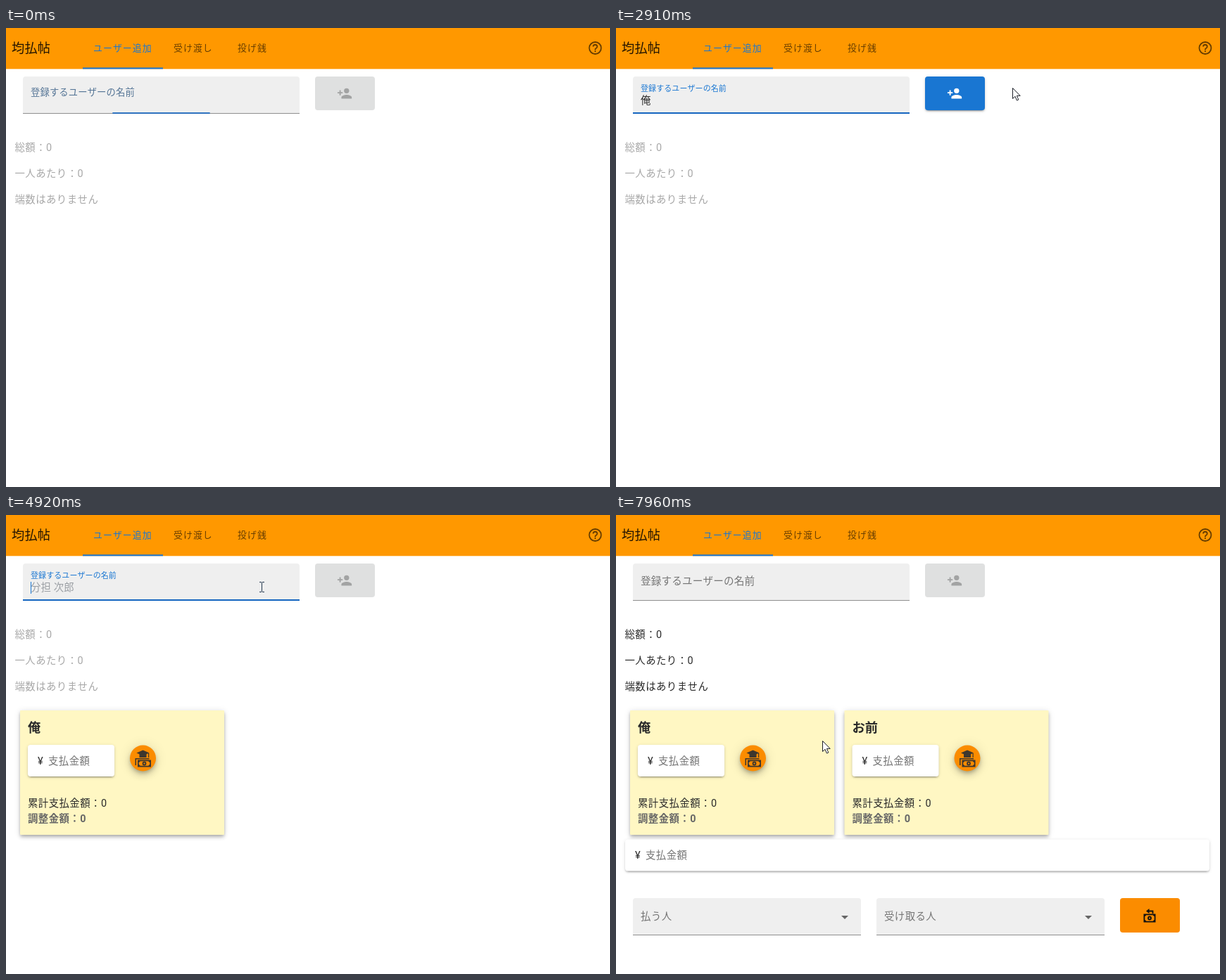
Recreate the animation shown at these times as an HTML page with a canvas. Size 858x653 px, loop 8000 ms.

```html
<!DOCTYPE html>
<html lang="ja">
<head>
<meta charset="utf-8">
<title>割り勘メモ</title>
<style>
html, body { margin: 0; width: 100%; height: 100%; overflow: hidden; background: #fff; }
canvas { display: block; }
</style>
</head>
<body>
<canvas id="stage" width="858" height="653"></canvas>
<script>
const ctx = document.getElementById('stage').getContext('2d');
const LOOP = 8000;
const BLUE = '#1976d2', ORANGE = '#fb8c00', INK = '#2a2a2a', MUTED = '#757575';
const FONT = 'Roboto, "Noto Sans CJK JP", "Noto Sans CJK", sans-serif';

const PERSON = new Path2D('M15 12a4 4 0 1 0 0-8 4 4 0 0 0 0 8zM6 10V7H4v3H1v2h3v3h2v-3h3v-2zM15 14c-2.67 0-8 1.34-8 4v2h16v-2c0-2.66-5.33-4-8-4z');
const QUESTION = new Path2D('M11 18h2v-2h-2zM12 6a4 4 0 0 0-4 4h2a2 2 0 0 1 4 0c0 2-3 1.75-3 5h2c0-2.25 3-2.5 3-5a4 4 0 0 0-4-4z');
const ARROW = new Path2D('M.5 .5V15.5L4 12.3L6.4 18L8.8 17L6.4 11.4H11.2Z');

// Shadow layers: offset, blur, spread, alpha
const LOW = [[3, 1, -2, 0.2], [2, 2, 0, 0.14], [1, 5, 0, 0.12]];
const MID = [[2, 4, -1, 0.2], [4, 5, 0, 0.14], [1, 10, 0, 0.12]];
const HIGH = [[3, 5, -1, 0.2], [6, 10, 0, 0.14], [1, 18, 0, 0.12]];

const clamp = v => Math.min(1, Math.max(0, v));
const ease = v => { v = clamp(v); return v * v * (3 - 2 * v); };
const mix = (a, b, p) => a + (b - a) * p;
const within = (t, spans) => spans.some(([a, b]) => t >= a && t < b);
const last = (t, list) => list.filter(s => s[0] <= t).pop();

// Timeline
const ADDED = [3855, 7600];
const PRESSED = [3600, 7430];
const FOCUS = [[-72, 1], [420, 0], [900, 1], [ADDED[0], 0], [4560, 1], [ADDED[1], 0]];
const CARET = [[960, 1370], [1570, 2570], [3070, 3570], [4640, 6620], [7120, 7430]];
const ENABLED = [[1570, ADDED[0]], [5200, ADDED[1]]];
const COMPOSING = [[1570, 2110], [5200, 6210]];
const TYPED = [
  [-100, ''], [1570, 'お'], [1700, 'おr'], [1770, 'おれ'], [1910, '俺'], [ADDED[0], ''],
  [5200, 'お'], [5340, 'おm'], [5540, 'おま'], [5740, 'おまえ'], [6010, 'お前'], [ADDED[1], '']
];
const HINTS = [[1570, 1910, ['俺', '俺の']], [5200, 6010, ['お前', 'お前の']]];
const MOUSE = [
  [210, 743, 610], [300, 743, 610], [680, 233, 182], [830, 197, 113], [2500, 197, 113],
  [2880, 563, 85], [2950, 563, 85], [3320, 525, 93], [4020, 523, 90],
  [4160, 472, 93], [4440, 363, 102], [6560, 363, 102],
  [6960, 425, 121], [7280, 480, 102], [7600, 480, 102], [7940, 293, 321]
];

function text(s, x, mid, size, color, weight = 400, space = 0) {
  ctx.font = `${weight} ${size}px ${FONT}`;
  ctx.letterSpacing = space + 'px';
  ctx.fillStyle = color;
  ctx.fillText(s, x, mid + size * 0.375);
}
const body = (s, x, mid, color, weight) => text(s, x, mid, 14.4, color, weight, 0.45);

function rect(x, y, w, h, color) {
  ctx.fillStyle = color;
  ctx.fillRect(x, y, w, h);
}

function box(x, y, w, h, radius, color) {
  ctx.fillStyle = color;
  ctx.beginPath();
  ctx.roundRect(x, y, w, h, radius);
  ctx.fill();
}

// The caster stands off stage so that only its shadow shows.
function raised(x, y, w, h, radius, color, layers) {
  const away = 2000;
  ctx.save();
  ctx.shadowOffsetX = away;
  for (const [dy, blur, spread, alpha] of layers) {
    ctx.shadowColor = `rgba(0,0,0,${alpha})`;
    ctx.shadowBlur = blur;
    ctx.shadowOffsetY = dy;
    box(x - spread - away, y - spread, w + 2 * spread, h + 2 * spread, radius, '#000');
  }
  ctx.restore();
  box(x, y, w, h, radius, color);
}

function icon(path, x, y, scale, color) {
  ctx.save();
  ctx.translate(x, y);
  ctx.scale(scale, scale);
  ctx.fillStyle = color;
  ctx.fill(path);
  ctx.restore();
}

function poly(points, color) {
  ctx.fillStyle = color;
  ctx.beginPath();
  points.forEach(([x, y]) => ctx.lineTo(x, y));
  ctx.fill();
}

function ring(x, y, r, width, color) {
  ctx.strokeStyle = color;
  ctx.lineWidth = width;
  ctx.beginPath();
  ctx.arc(x, y, r, 0, 7);
  ctx.stroke();
}

const inside = (p, x, y, w, h) => p && p.x >= x && p.x <= x + w && p.y >= y && p.y <= y + h;
const overField = p => inside(p, 24, 69, 393, 53);
const overButton = p => inside(p, 439, 69, 85, 48);

function filled(x, y, w, line = '#8f8f8f') {
  box(x, y, w, 53, [4, 4, 0, 0], '#efefef');
  rect(x, y + 52, w, 1, line);
}

function header() {
  rect(0, 0, 858, 58.3, '#ff9800');
  text('均払帖', 8, 28, 18.2, 'rgba(0,0,0,.87)', 400, 0.2);
  const dim = 'rgba(0,0,0,.6)';
  [['ユーザー追加', 124, BLUE], ['受け渡し', 238, dim], ['投げ銭', 329, dim]]
    .forEach(([s, x, c]) => text(s, x, 28.5, 12.85, c, 400, 1.1));
  rect(109, 56.3, 114, 2, BLUE);
  ring(837, 28.5, 8.5, 1.8, dim);
  icon(QUESTION, 825.7, 17.2, 0.94, dim);
}

function nameField(t, mouse) {
  filled(24, 69, 393, overField(mouse) ? '#333' : undefined);
  const s = t < 70 ? 0 : t;
  const [start, on] = last(s, FOCUS);
  const e = ease((s - start) / 180);
  const p = on ? e : 1 - e;

  ctx.globalAlpha = on ? clamp(e * 2.4) : p;
  const w = on ? 393 * e : 393;
  if (p > 0) rect(220.5 - w / 2, 120, w, 2, '#1565c0');
  ctx.globalAlpha = 1;

  const color = `rgb(${mix(117, 25, p)},${mix(117, 118, p)},${mix(117, 210, p)})`;
  const size = mix(14.6, 10.98, p);
  text('登録するユーザーの名前', 35, mix(94, 86, p), size, color, 400, size * 0.01);

  const typed = last(t, TYPED)[1];
  if (!typed && on) {
    ctx.globalAlpha = clamp((s - start - 110) / 67);
    text('分担 次郎', 35, 103, 14.4, '#9b9fa4', 400, 0.15);
    ctx.globalAlpha = 1;
  }
  text(typed, 35, 103, 14.4, INK, 400, 0.15);
  const width = ctx.measureText(typed).width;
  if (typed && within(t, COMPOSING)) rect(35, 111, width, 1, INK);
  if (within(t, CARET)) rect(Math.round(35 + width), 95, 1, 17, BLUE);
}

function ripple(t, mouse) {
  const age = t - (PRESSED.filter(p => p <= t).pop() ?? -LOOP);
  if (age > 450) return;
  ctx.save();
  ctx.beginPath();
  ctx.roundRect(439, 69, 85, 48, 4);
  ctx.clip();
  const p = ease(age / 225);
  ctx.fillStyle = `rgba(255,255,255,${0.24 * clamp((450 - age) / 200)})`;
  ctx.beginPath();
  ctx.arc(mix(mouse.x, 481.5, p), mix(mouse.y, 93, p), mix(15, 52, p), 0, 7);
  ctx.fill();
  ctx.restore();
}

function addButton(t, mouse) {
  const on = within(t, ENABLED);
  if (on) raised(439, 69, 85, 48, 4, BLUE, LOW);
  else box(439, 69, 85, 48, 4, '#dfe0e0');
  if (overButton(mouse)) box(439, 69, 85, 48, 4, on ? 'rgba(255,255,255,.08)' : 'rgba(0,0,0,.018)');
  if (on) ripple(t, mouse);
  icon(PERSON, 470, 82, 0.92, on ? '#fff' : '#a2a3a3');
}

function totals(ready) {
  const color = ready ? INK : '#a8a8a8';
  body('総額：0', 12.5, 170, color);
  body('一人あたり：0', 12.5, 207, color);
  body('端数はありません', 12.5, 244, color);
}

function amount(x, y, w) {
  raised(x, y, w, 45, 4, '#fff', LOW);
  text('¥', x + 14, y + 22.5, 14.6, INK);
  body('支払金額', x + 29, y + 22.5, MUTED);
}

function note(x, y, w, h, color) {
  rect(x, y, w, h, color);
  const [l, r, u, d] = [x + 1.8, x + w - 1.8, y + 1.8, y + h - 1.8];
  poly([[l + 2, u], [r - 2, u], [r, u + 2], [r, d - 2], [r - 2, d], [l + 2, d], [l, d - 2], [l, u + 2]], ORANGE);
  ring(x + w / 2, y + h / 2, 2, 1.8, color);
}

function tipButton(x, y) {
  const dark = '#3d372e';
  raised(x - 18.5, y - 18.5, 37, 37, 18.5, ORANGE, HIGH);
  poly([[x - 9, y - 7.5], [x, y - 11.5], [x + 9, y - 7.5], [x, y - 3.5]], dark);
  rect(x - 5, y - 6, 10, 5, dark);
  rect(x + 7.5, y - 7, 1.2, 6, dark);
  poly([[x - 11, y], [x + 9, y], [x + 9, y + 1.5], [x - 9.5, y + 1.5], [x - 9.5, y + 10], [x - 11, y + 10]], dark);
  note(x - 7.5, y + 2.5, 19, 10, dark);
}

function card(x, name) {
  raised(x, 278, 290, 177, 1, '#fff7c3', MID);
  text(name, x + 11, 302, 18.2, INK, 700);
  amount(x + 11, 327, 123);
  tipButton(x + 174.5, 346);
  body('累計支払金額：0', x + 11, 410, INK);
  body('調整金額：0', x + 11, 432, '#666', 700);
}

function select(x, label) {
  filled(x, 545, 324);
  body(label, x + 11, 570.5, MUTED);
  poly([[x + 296, 570], [x + 306, 570], [x + 301, 575]], '#666');
}

function transfer() {
  amount(13, 461.5, 830);
  select(24, '払う人');
  select(370, '受け取る人');
  box(716, 545, 85, 49, 4, ORANGE);
  note(749.5, 567.5, 17, 12, '#111');
  ctx.beginPath();
  [[762.5, 567], [762.5, 563.5], [756, 563.5]].forEach(([x, y]) => ctx.lineTo(x, y));
  ctx.stroke();
  poly([[753, 563.5], [757.5, 560], [757.5, 567]], '#111');
}

function hints(t) {
  const open = HINTS.find(h => t >= h[0] && t < h[1]);
  if (!open) return;
  rect(28, 126, 109, 50, '#c8c8c8');
  rect(29, 127, 107, 48, '#fff');
  open[2].forEach((s, i) => text(s, 45, 143.5 + i * 19, 12, INK));
}

function mouseAt(t) {
  if (t < MOUSE[0][0]) return null;
  const i = MOUSE.findIndex(m => m[0] > t);
  if (i < 0) {
    const [, x, y] = MOUSE[MOUSE.length - 1];
    return { x, y };
  }
  const [a, b] = [MOUSE[i - 1], MOUSE[i]];
  const p = ease((t - a[0]) / (b[0] - a[0]));
  return { x: Math.round(mix(a[1], b[1], p)), y: Math.round(mix(a[2], b[2], p)) };
}

function pointer(mouse) {
  const { x, y } = mouse;
  if (overField(mouse)) {
    const dark = '#24384f';
    rect(x, y - 6, 1, 13, dark);
    [-7, 7].forEach(dy => {
      rect(x - 3, y + dy, 3, 1, dark);
      rect(x + 1, y + dy, 3, 1, dark);
    });
    return;
  }
  ctx.save();
  ctx.translate(x, y);
  ctx.fillStyle = '#fff';
  ctx.fill(ARROW);
  ctx.strokeStyle = '#1c1f28';
  ctx.lineWidth = 1;
  ctx.stroke(ARROW);
  ctx.restore();
}

function draw(t) {
  const mouse = mouseAt(t);
  rect(0, 0, 858, 653, '#fff');
  header();
  nameField(t, mouse);
  addButton(t, mouse);
  totals(t >= ADDED[1]);
  if (t >= ADDED[0]) card(20, '俺');
  if (t >= ADDED[1]) {
    card(324.5, 'お前');
    transfer();
  }
  hints(t);
  if (mouse) pointer(mouse);
}

const begin = performance.now();
function tick() {
  draw((performance.now() - begin) % LOOP);
  requestAnimationFrame(tick);
}
tick();
</script>
</body>
</html>
```
